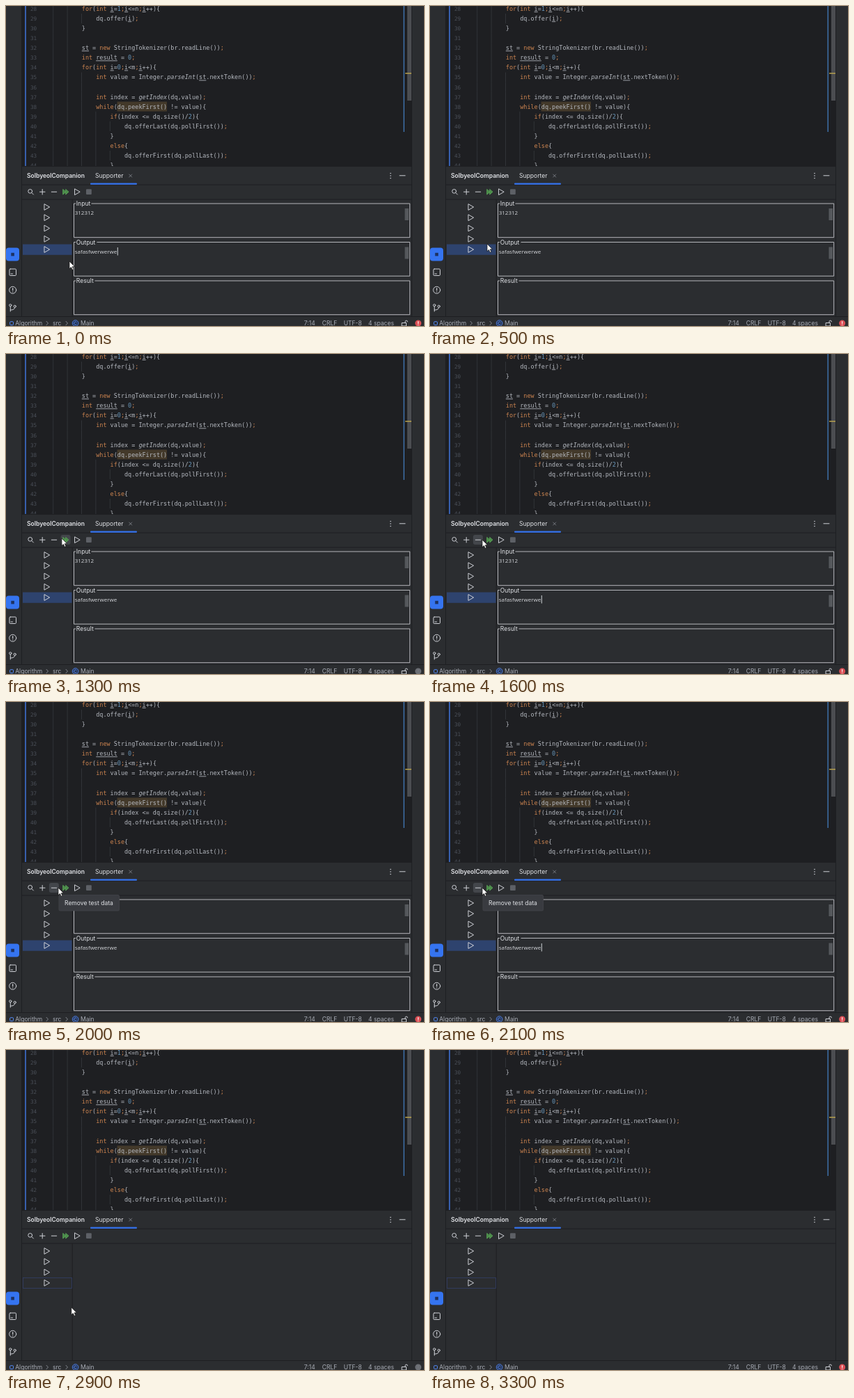
Animation, 600 px wide and 460 px high, one loop 3400 ms. Source, as an HTML page:

```html
<!DOCTYPE html>
<html lang="en">
<head>
<meta charset="utf-8">
<title>Test data panel</title>
<style>
html, body { margin: 0; width: 100%; height: 100%; overflow: hidden; background: #2b2d30; }
svg { display: block; width: 600px; height: 460px; }
text { font: 8.55px Inter, "Noto Sans", sans-serif; fill: #dfe1e5; white-space: pre; }
.code text { font: 8.47px "DejaVu Sans Mono", "Noto Sans Mono", monospace; fill: #b4b8bf; }
.code .num { font-size: 7.6px; fill: #4b5059; }
.code .key { fill: #cc8450; }
.code .lit { fill: #6897bb; }
.code .static { font-style: italic; }
.code .var { text-decoration: underline; }
.field { font: 8px "Open Sans", "Noto Sans", sans-serif; fill: #d5d7db; }
.status text { fill: #a9adb6; }
.icon { fill: none; stroke: #ced0d6; stroke-width: 1; stroke-linecap: round; stroke-linejoin: round; }
.edge { fill: #1e1f22; }
</style>
</head>
<body>
<svg viewBox="0 0 600 460">
  <defs>
    <path id="play" d="M-3.3 -4.2 L4 0 L-3.3 4.2 Z"/>
    <clipPath id="editorClip"><rect x="23" width="559" height="230"/></clipPath>
  </defs>
  <rect width="600" height="460" fill="#2b2d30"/>

  <g class="code" clip-path="url(#editorClip)">
    <rect class="edge" x="22.5" width="560" height="230"/>
    <rect x="27" width="2" height="230" fill="#375fad"/>
    <g id="guides" stroke="#313438"/>
    <rect x="159.5" y="137.5" width="71.5" height="14" fill="#43392a"/>
    <g id="lines"/>
    <rect x="570.5" width="1.5" height="181" fill="#3d6ea5"/>
    <rect x="576" width="6" height="136" fill="#4b4d51"/>
    <rect x="573" y="96" width="9" height="1.5" fill="#b5a04e"/>
  </g>

  <g class="edge">
    <rect x="22" y="0" width="1" height="447"/>
    <rect x="582" y="0" width="1" height="447"/>
    <rect x="22" y="230" width="561" height="1"/>
    <rect x="23" y="256.5" width="559" height="1"/>
    <rect x="23" y="277.5" width="559" height="1"/>
    <rect x="94.7" y="278" width="1" height="168"/>
    <rect x="0" y="446" width="600" height="1"/>
  </g>

  <text x="30" y="247" font-weight="600" style="font-weight:600">SolbyeolCompanion</text>
  <text x="128" y="247">Supporter</text>
  <rect x="121" y="254.5" width="67" height="2.2" rx="1" fill="#3574f0"/>
  <path class="icon" d="M176.7 242 l4 4 m0 -4 l-4 4" style="stroke:#868a91;stroke-width:.8"/>
  <g fill="#ced0d6"><circle cx="552" cy="240.5" r=".8"/><circle cx="552" cy="244" r=".8"/><circle cx="552" cy="247.5" r=".8"/></g>
  <path class="icon" d="M565 243.8 h8"/>

  <rect id="hover" y="260" width="14" height="14" rx="3" fill="#43464b"/>
  <g class="icon">
    <circle cx="34.7" cy="266.3" r="2.9"/>
    <path d="M37 268.6 l2.4 2.4 M48.5 267.2 h7.5 M52.2 263.5 v7.5 M65.3 267.2 h7.4"/>
    <path d="M82 263.7 l4 3.5 l-4 3.5 Z M86 263.7 l4 3.5 l-4 3.5 Z" style="stroke:#57a055;fill:#4a8a49"/>
    <use href="#play" x="102.2" y="267.2"/>
  </g>
  <rect x="115" y="263.3" width="7.8" height="7.8" rx="1" fill="#5d6066"/>

  <rect id="selected" x="24" y="342.5" width="70.5" height="15.3" fill="#2e436e"/>
  <rect id="focused" x="24.5" y="327.5" width="70" height="15" fill="none" stroke="#333f68" stroke-width=".8"/>
  <g id="rows" class="icon"/>

  <g id="form">
    <g id="boxes"></g>
    <g fill="#55585c">
      <rect x="572.5" y="291" width="5.5" height="17"/>
      <rect x="572.5" y="346.5" width="5.5" height="17"/>
    </g>
    <text class="field" x="98.7" y="300.3">312312</text>
    <text class="field" x="98.7" y="355.8">safasfwerwerwe</text>
    <rect id="caret" x="159.8" y="347" width=".9" height="11.5" fill="#e2e4e8"/>
  </g>

  <rect x="0" y="347.5" width="19" height="19" rx="4" fill="#3574f0"/>
  <rect x="7.3" y="354.8" width="4.6" height="4.6" fill="#1d3263"/>
  <g class="icon">
    <rect x="5" y="378" width="9.5" height="9.5" rx="1.2"/>
    <path d="M7 385 h2.5"/>
    <circle cx="9.7" cy="408.3" r="5"/>
    <path d="M9.7 405.5 v3.2 M9.7 410.9 v.1" stroke-width="1.2"/>
    <circle cx="6.3" cy="430.2" r="1.6"/>
    <circle cx="12.7" cy="431.8" r="1.6"/>
    <path d="M6.3 432 v7 M6.3 437 q6 .2 6.4 -3.5"/>
  </g>

  <g class="status">
    <rect x="5.7" y="453.7" width="4.8" height="4.8" rx=".8" fill="none" stroke="#548af7"/>
    <text x="13.2" y="459">Algorithm</text>
    <text x="67" y="459">src</text>
    <text x="107" y="459">Main</text>
    <path class="icon" d="M58 453.3 l2.5 2.7 l-2.5 2.7 M86 453.3 l2.5 2.7 l-2.5 2.7" style="stroke:#8b8f97;stroke-width:.9"/>
    <circle cx="99.6" cy="456" r="4.3" fill="#25324d" stroke="#548af7" stroke-width=".9"/>
    <path class="icon" d="M101.2 454.6 a2.1 2.1 0 1 0 0 2.8" style="stroke:#548af7"/>
    <text x="427.7" y="459">7:14</text>
    <text x="453.8" y="459">CRLF</text>
    <text x="484.7" y="459">UTF-8</text>
    <text x="520" y="459">4 spaces</text>
    <path class="icon" d="M568.5 455.5 h6 v4.5 h-6 Z M573 455.5 v-1.7 a1.7 1.7 0 0 1 3.4 0"/>
    <circle id="alarm" cx="591.7" cy="456" r="4.5"/>
    <path id="bang" d="M591.7 453.5 v3 M591.7 458.2 v.2" stroke-width="1.1" stroke-linecap="round"/>
  </g>

  <g id="tip">
    <rect x="76" y="277.5" width="86.5" height="22.5" rx="1.5" fill="#393b40" stroke="#43454a" stroke-width=".8"/>
    <text x="84" y="291.5">Remove test data</text>
  </g>
  <path id="pointer" d="M0 0 V10.6 L2.5 8.4 L4.2 12.3 L6 11.5 L4.3 7.7 H7.6 Z" fill="#fff" stroke="#111" stroke-width=".7"/>
</svg>
<script>
const LOOP = 3400, STEP = 100, CHAR = 5.1;
const NS = "http://www.w3.org/2000/svg";
const $ = id => document.getElementById(id);

function add(parent, tag, attrs, content = "") {
  const el = document.createElementNS(NS, tag);
  for (const k in attrs) el.setAttribute(k, attrs[k]);
  el.textContent = content;
  parent.append(el);
  return el;
}

// Source lines from 28 on; each starts with its nesting depth.
const source = [
  "0for(int i=1;i<=n;i++){",
  "1dq.offer(i);",
  "0}",
  "0",
  "0st = new StringTokenizer(br.readLine());",
  "0int result = 0;",
  "0for(int i=0;i<m;i++){",
  "1int value = Integer.parseInt(st.nextToken());",
  "1",
  "1int index = getIndex(dq,value);",
  "1while(dq.peekFirst() != value){",
  "2if(index <= dq.size()/2){",
  "3dq.offerLast(dq.pollFirst());",
  "2}",
  "2else{",
  "3dq.offerFirst(dq.pollLast());",
  "2}"
];
const kinds = [
  ["key", /^(for|int|new|while|if|else|;)$/],
  ["lit", /^\d$/],
  ["static", /^(parseInt|getIndex)$/],
  ["var", /^(i|st|result)$/]
];
const rowY = n => 4 + n * 14.07;

source.forEach((line, n) => {
  const y = rowY(n) + 3, depth = +line[0];
  add($("lines"), "text", { x: 35, y, class: "num" }, n + 28);
  const text = add($("lines"), "text", { x: 108.8 + depth * 4 * CHAR, y });
  for (const word of line.slice(1).match(/\w+|;|[^\w;]+/g) || []) {
    const kind = kinds.find(k => k[1].test(word));
    add(text, "tspan", kind ? { class: kind[0] } : {}, word);
  }
  for (let d = -2; d < depth; d++) {
    const x = 108.5 + d * 4 * CHAR;
    add($("guides"), "line", { x1: x, x2: x, y1: rowY(n) - 7.1, y2: rowY(n) + 7.1 });
  }
});

const rows = [289, 304.2, 319.5, 334.8, 350].map(y =>
  add($("rows"), "use", { href: "#play", x: 58.6, y }));

[["Input", 284, 122.5], ["Output", 339.5, 130.5], ["Result", 395, 127.5]].forEach(([label, y, end]) => {
  add($("boxes"), "path", {
    d: `M100 ${y} H97.5 V${y + 48.7} H579.7 V${y} H${end}`,
    fill: "none", stroke: "#c4c6ca", "stroke-width": .9
  });
  add($("boxes"), "text", { x: 100.8, y: y + 3 }, label);
});

// time, x, y of the pointer tip
const path = [
  [0, 91, 367], [200, 90, 364], [500, 82, 342], [800, 53, 270], [900, 52, 268],
  [1000, 53, 268], [1300, 80, 265], [1500, 75, 267], [2200, 75, 267],
  [2500, 80, 290], [2700, 83, 300], [3200, 110, 475]
];

function pointerAt(t) {
  const i = path.findIndex(p => p[0] > t);
  if (i < 0) return null;
  const [a, b] = [path[i - 1], path[i]];
  const k = (t - a[0]) / (b[0] - a[0]);
  return [a[1] + (b[1] - a[1]) * k, a[2] + (b[2] - a[2]) * k];
}

const show = (el, on) => { el.style.display = on ? "" : "none"; };

function draw(now) {
  const t = Math.floor(now % LOOP / STEP) * STEP;
  const removed = t >= 2300;

  const tip = pointerAt(t);
  show($("pointer"), tip);
  if (tip) $("pointer").setAttribute("transform", `translate(${tip})`);

  // Toolbar buttons sit 16.7px apart, starting with the plus.
  const slot = tip && tip[1] > 259 && tip[1] < 275 ? Math.round((tip[0] - 52.2) / 16.7) : -1;
  show($("hover"), slot >= 0);
  $("hover").setAttribute("x", 45.2 + slot * 16.7);

  show($("tip"), t >= 1900 && !removed);
  show($("form"), !removed);
  show($("selected"), !removed);
  show($("focused"), removed);
  show(rows[4], !removed);
  show($("caret"), (t + 180) % 750 < 325);

  const alert = t % 1500 < 750;
  $("alarm").setAttribute("fill", alert ? "#db4f55" : "#6b6e74");
  $("bang").setAttribute("stroke", alert ? "#fff" : "#74777d");
}

function tick() {
  draw(performance.now());
  requestAnimationFrame(tick);
}
tick();
</script>
</body>
</html>
```
